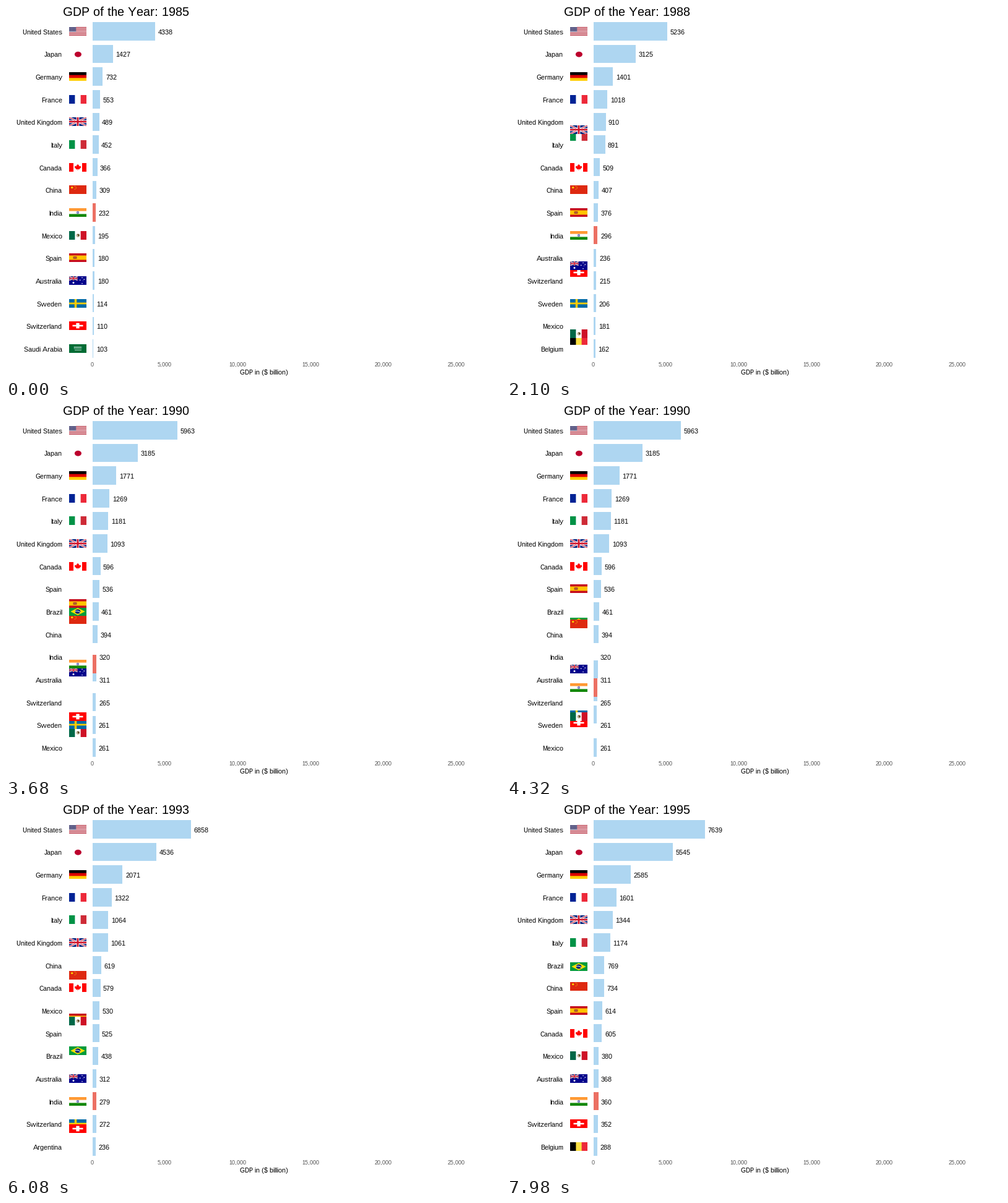
A matplotlib script that plays this animation: 800 px wide and 600 px high, repeating every 8000 ms.

```python
import numpy as np
import matplotlib.pyplot as plt
from matplotlib.animation import FuncAnimation
from matplotlib.patches import Rectangle
from matplotlib.path import Path

plt.rcParams.update({
    "font.family": "Liberation Sans",
    "text.hinting": "native",
    "text.hinting_factor": 1,
    "text.kerning_factor": 6,
})

WIDTH, HEIGHT, DPI = 800, 600, 100
INTERVAL, FRAMES = 20, 400
STEP, MOVE, HOLD = 39, 31, 7       # frames per year, per move, before first move
FIRST_YEAR, ROWS = 1985, 15
ROW_GAP = 36.64
ZERO_X, SCALE = 139.05, 0.02354
FLAG_W, FLAG_H, FINE = 28, 14, 8
BAR, ACCENT = "#AED6F1", "#EC7063"
HIGHLIGHT = "India"

# ---------------------------------------------------------------- flags
Y, X = (np.mgrid[0:FLAG_H * FINE, 0:FLAG_W * FINE] + 0.5) / FINE
WHITE, RED, NAVY = (255, 255, 255), (237, 41, 57), (0, 36, 125)


def field(color):
    return np.ones(X.shape + (3,)) * color


def paint(img, *layers):
    for mask, color in layers:
        img[mask] = color
    return img


def bands(colors, cuts=(1 / 3, 2 / 3), vertical=True):
    img = field(colors[0])
    pos = X / FLAG_W if vertical else Y / FLAG_H
    for cut, color in zip(cuts, colors[1:]):
        img[pos > cut] = color
    return img


def disc(cx, cy, rx, ry=None):
    return ((X - cx) / rx) ** 2 + ((Y - cy) / (ry or rx)) ** 2 < 1


def box(x0, y0, x1, y1):
    return (X > x0) & (X < x1) & (Y > y0) & (Y < y1)


def any_of(masks):
    return np.any(list(masks), axis=0)


def union_jack(img, zoom=1):
    x, y = X * zoom, Y * zoom
    inside = (x < 28) & (y < 14)
    diagonal = np.minimum(abs(x - 2 * y), abs(x + 2 * y - 28)) / 5 ** 0.5
    cross = np.minimum(abs(x - 14), abs(y - 7))
    return paint(img, (inside, NAVY),
                 (inside & (diagonal < 1.4), WHITE),
                 (inside & (diagonal < 0.5), (207, 20, 43)),
                 (inside & (cross < 2.33), WHITE),
                 (inside & (cross < 1.4), (207, 20, 43)))


def united_states():
    stripe = (Y * 13 / FLAG_H).astype(int) % 2 == 0
    canton = box(0, 0, 11.2, 7.54)
    stars = canton & (np.hypot(X % 1.87 - 0.93, Y % 1.5 - 0.75) < 0.42)
    return paint(field(WHITE), (stripe, (178, 34, 52)),
                 (canton, (60, 59, 110)), (stars, WHITE))


def canada():
    half = [(0, 1.6), (1.1, 3.4), (2.1, 3.0), (1.8, 5.6), (3.3, 4.4),
            (3.7, 5.2), (5.2, 5.0), (4.7, 6.6), (5.4, 7.2), (2.6, 9.4),
            (2.9, 10.3), (0.3, 10.0), (0.3, 12.3)]
    outline = [(14 + x, y) for x, y in half]
    outline += [(14 - x, y) for x, y in half[::-1]]
    points = np.column_stack([X.ravel(), Y.ravel()])
    leaf = Path(outline).contains_points(points).reshape(X.shape)
    red = (255, 0, 0)
    return paint(bands([red, WHITE, red], (0.25, 0.75)), (leaf, red))


def china():
    small = [(9.3, 1.5), (11.2, 2.9), (11.2, 4.9), (9.3, 6.3)]
    stars = any_of([disc(4.7, 3.6, 1.7, 1.4)]
                   + [disc(x, y, 0.6, 0.5) for x, y in small])
    return paint(field((222, 41, 16)), (stars, (255, 222, 0)))


def india():
    r = np.hypot(X - 14, Y - 7)
    wheel = ((r < 2) & (r > 1.5)) | (r < 0.7)
    return paint(bands([(255, 153, 51), WHITE, (19, 136, 8)], vertical=False),
                 (wheel, (0, 0, 136)))


def spain():
    red = (198, 11, 30)
    return paint(bands([red, (255, 196, 0), red], (0.25, 0.75), False),
                 (box(6.4, 5, 12.6, 9), (190, 110, 30)),
                 (box(7.6, 5.2, 11.4, 8.8), (160, 60, 30)),
                 (box(8.8, 6.4, 10.2, 7.6), (215, 160, 120)))


def australia():
    dots = [(7, 10.5, 1.5), (21, 2.3, 0.8), (21, 11.7, 0.8),
            (17.7, 6.3, 0.8), (24.2, 5.2, 0.8), (22.5, 7.6, 0.45)]
    stars = any_of(disc(*dot) for dot in dots)
    img = union_jack(field((0, 0, 139)), 2)
    return paint(img, (stars, WHITE))


def switzerland():
    cross = box(5.5, 5.7, 22.5, 8.3) | box(11.4, 2.6, 16.6, 11.4)
    return paint(field((255, 0, 0)), (cross, WHITE))


def mexico():
    return paint(bands([(0, 104, 71), WHITE, (206, 17, 38)]),
                 (disc(14.3, 7, 2.9, 2.7), (175, 165, 135)),
                 (disc(14.8, 6.6, 1.8, 1.6), (100, 75, 40)),
                 (disc(13.2, 7.3, 0.9), (225, 220, 200)))


def sweden():
    cross = box(8.75, 0, 12.25, 14) | box(0, 5.6, 28, 8.4)
    return paint(field((0, 106, 167)), (cross, (254, 204, 0)))


def saudi_arabia():
    script = box(7.5, 3.2, 20.5, 7.4) & (np.sin(3.1 * X) + np.cos(2.6 * Y) > 0.1)
    return paint(field((0, 108, 53)), (script, (225, 238, 230)),
                 (box(9, 9.2, 20, 10), (225, 238, 230)))


def brazil():
    rhombus = abs(X - 14) / 11.7 + abs(Y - 7) / 5.9 < 1
    globe = disc(14, 7, 4.4, 3.6)
    ribbon = globe & (abs(np.hypot(X - 12.5, Y - 14) - 7.8) < 0.45)
    return paint(field((0, 155, 58)), (rhombus, (254, 223, 0)),
                 (globe, (0, 39, 118)), (ribbon, WHITE))


def argentina():
    sky = (116, 172, 223)
    return paint(bands([sky, WHITE, sky], vertical=False),
                 (disc(14, 7, 1.6), (246, 180, 14)))


def render(img):
    blocks = img.reshape(FLAG_H, FINE, FLAG_W, FINE, 3)
    return blocks.mean(axis=(1, 3)).round().astype(np.uint8)


# ---------------------------------------------------------------- data
series, flag_pixels = {}, {}


def add(name, flag, values):
    """Yearly values in $ billion; 0 means outside the ranking."""
    series[name] = values
    flag_pixels[name] = render(flag)


add("United States", united_states(),
    [4338, 4579, 4855, 5236, 5641, 5963, 6158, 6520, 6858, 7287, 7639, 8073])
add("Japan", paint(field(WHITE), (disc(14.4, 7.2, 5.5, 4.4), (188, 0, 45))),
    [1427, 2120, 2584, 3125, 3055, 3185, 3648, 3988, 4536, 4998, 5545, 4834])
add("Germany", bands([(0, 0, 0), (221, 0, 0), (255, 206, 0)], vertical=False),
    [732, 1046, 1298, 1401, 1398, 1771, 1868, 2131, 2071, 2205, 2585, 2498])
add("France", bands([(0, 35, 149), WHITE, RED]),
    [553, 771, 934, 1018, 1025, 1269, 1269, 1401, 1322, 1393, 1601, 1605])
add("United Kingdom", union_jack(field(NAVY)),
    [489, 601, 745, 910, 926, 1093, 1142, 1179, 1061, 1140, 1344, 1419])
add("Italy", bands([(0, 146, 70), WHITE, (206, 43, 55)]),
    [452, 640, 805, 891, 928, 1181, 1246, 1320, 1064, 1099, 1174, 1312])
add("Canada", canada(),
    [366, 379, 433, 509, 565, 596, 612, 594, 579, 579, 605, 629])
add("China", china(),
    [309, 300, 327, 407, 456, 394, 413, 493, 619, 564, 734, 864])
add("India", india(),
    [232, 248, 284, 296, 296, 320, 270, 288, 279, 333, 360, 393])
add("Spain", spain(),
    [180, 251, 318, 376, 413, 536, 577, 629, 525, 529, 614, 641])
add("Australia", australia(),
    [180, 182, 190, 236, 299, 311, 325, 325, 312, 353, 368, 401])
add("Sweden", sweden(),
    [114, 150, 175, 206, 217, 261, 274, 281, 0, 0, 0, 0])
add("Mexico", mexico(),
    [195, 134, 148, 181, 221, 261, 313, 363, 530, 527, 380, 411])
add("Switzerland", switzerland(),
    [110, 159, 204, 215, 204, 265, 268, 279, 272, 292, 352, 330])
add("Saudi Arabia", saudi_arabia(), [103] + [0] * 11)
add("Belgium", bands([(0, 0, 0), (250, 224, 66), RED]),
    [0, 120, 149, 162] + [0] * 6 + [288, 280])
add("Brazil", brazil(),
    [0] * 4 + [425, 461, 407, 400, 438, 558, 769, 851])
add("Argentina", argentina(), [0] * 8 + [236, 257, 0, 0])


def ranking(year):
    """Ranked (name, value) pairs of one year."""
    pairs = [(name, values[year]) for name, values in series.items()]
    return sorted(pairs, key=lambda pair: -pair[1])[:ROWS]


def bar_slots(state):
    """(row, value) of each bar by rank, with the highlighted one last."""
    slots = [(row, value, name == HIGHLIGHT)
             for row, (name, value) in enumerate(state)]
    return [slot[:2] for slot in sorted(slots, key=lambda slot: slot[2])]


states = [ranking(year) for year in range(12)]

# ---------------------------------------------------------------- stage
fig = plt.figure(figsize=(WIDTH / DPI, HEIGHT / DPI), dpi=DPI, facecolor="white")
ax = fig.add_axes([0, 0, 1, 1])
ax.axis("off")


def label(x, y, text="", px=11, **style):
    return ax.text(x, y, text, size=px * 72 / DPI, va="baseline", **style)


flags = {name: ax.imshow(pixels, extent=(102, 130, 14, 0), aspect="auto",
                         interpolation="nearest")
         for name, pixels in flag_pixels.items()}
bars = [ax.add_patch(Rectangle((140, 0), 1, 1, lw=0, antialiased=False, zorder=2,
                               fc=ACCENT if i == ROWS - 1 else BAR))
        for i in range(ROWS)]
baselines = [round(41.85 + ROW_GAP * row) + 4 for row in range(ROWS)]
names = [label(91, y, ha="right") for y in baselines]
amounts = [label(0, y) for y in baselines]
title = label(92, 16, px=20)
for tick in range(0, 25001, 5000):
    label(138.8 + tick * SCALE, 583, f"{tick:,}", px=9, ha="center", color="#4D4D4D")
label(417, 596, "GDP in ($ billion)", ha="center")
ax.set_xlim(0, WIDTH)
ax.set_ylim(HEIGHT, 0)


def mix(a, b, p):
    return a + (b - a) * p


def bar_end(value):
    return ZERO_X + SCALE * value


def draw(frame):
    year = max(frame - HOLD - 1, 0) // STEP
    p = min(max((frame - HOLD - STEP * year) / MOVE, 0), 1)
    before, after = states[year], states[year + 1]
    nearest = before if p < 0.5 else after
    title.set_text(f"GDP of the Year: {FIRST_YEAR + year + (p >= 0.5)}")

    for row in range(ROWS):
        name, value = nearest[row]
        names[row].set_text(name)
        amounts[row].set_text(str(value))
        shown = mix(before[row][1], after[row][1], p)
        amounts[row].set_x(round(bar_end(shown) + 4.6))

    for bar, (r0, v0), (r1, v1) in zip(bars, bar_slots(before), bar_slots(after)):
        center = 40.9 + ROW_GAP * mix(r0, r1, p)
        top, bottom = round(center - 14.7), round(center + 14.7)
        bar.set_bounds(140, top, round(bar_end(mix(v0, v1, p))) - 140, bottom - top)

    # Leaving flags wait in place; new ones appear when the move ends.
    source = {name: row for row, (name, _) in enumerate(before)}
    target = {name: row for row, (name, _) in enumerate(after)}
    present = target if p == 1 else source
    for name, image in flags.items():
        image.set_visible(name in present)
        if name in present:
            start = source.get(name, present[name])
            row = mix(start, target.get(name, start), p)
            top = round(33.9 + ROW_GAP * row)
            image.set_extent((102, 102 + FLAG_W, top + FLAG_H, top))
            image.set_zorder(3 + start / 100)
    return []


anim = FuncAnimation(fig, draw, frames=FRAMES, interval=INTERVAL,
                     init_func=lambda: draw(0), repeat=True, repeat_delay=0)
plt.show()
```
